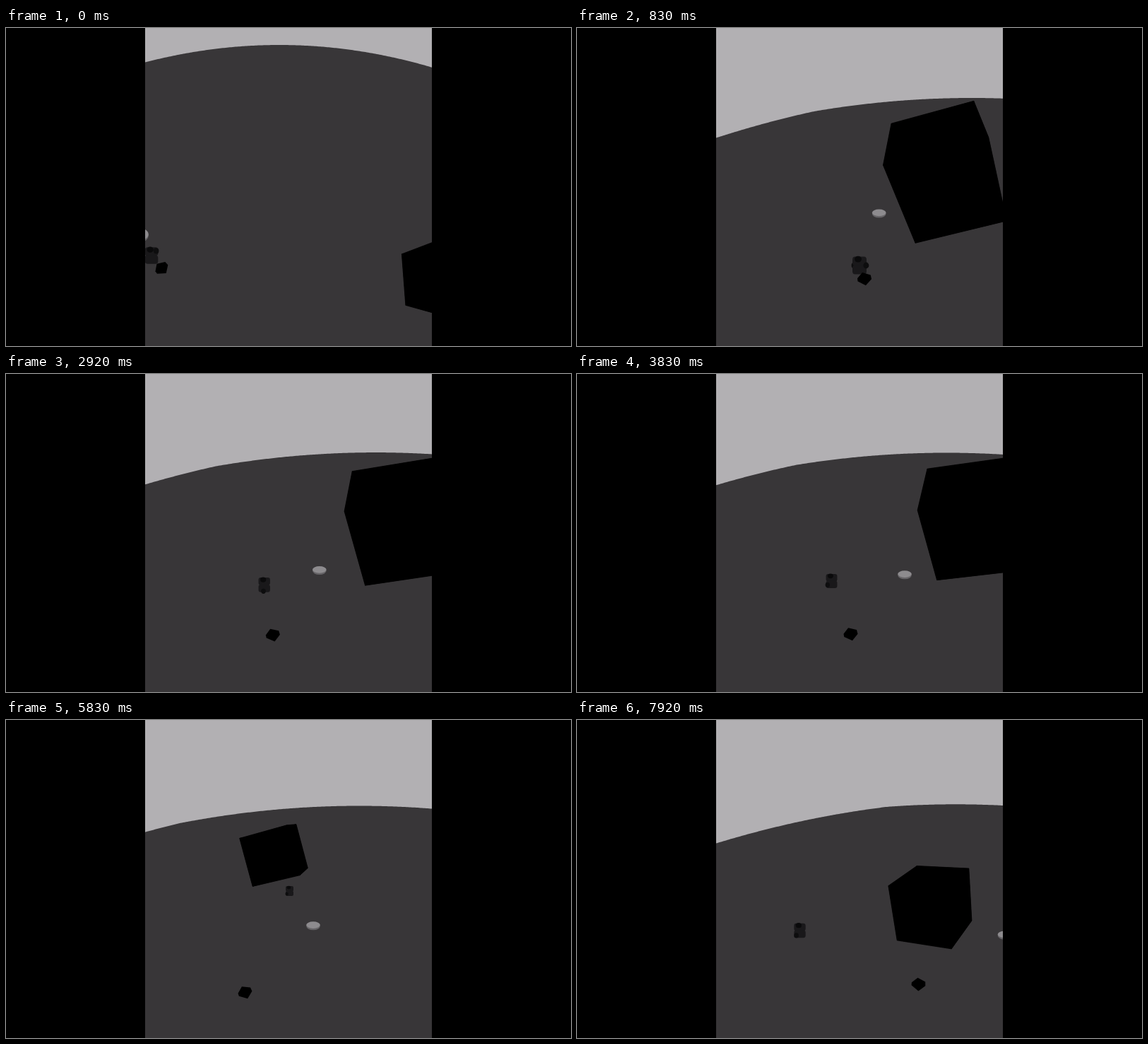
Animation of 800x450 px, one loop 8 s. Source, as an HTML page with a canvas:

```html
<!DOCTYPE html>
<html lang="en">
<head>
<meta charset="utf-8">
<title>Tumbling blocks</title>
<style>
  html, body { margin: 0; width: 100%; height: 100%; overflow: hidden; background: #000; }
  canvas { display: block; width: 100vw; height: 100vh; }
</style>
</head>
<body>
<canvas id="stage" width="800" height="450"></canvas>
<script>
const ctx = document.getElementById('stage').getContext('2d');
const LOOP = 8000, STEPS = 96;
const LEFT = 197, RIGHT = 603, HEIGHT = 450;
const FOCAL = 480;
const rad = degrees => degrees * Math.PI / 180;

// Key poses; `at` counts steps of 1/12 s.
// ridge: apex x, y; block: centre x, y, size, yaw, pitch, roll;
// chip and disc: centre x, y; figure: centre x, y, arm direction
const poses = [
  { at: 0, ridge: [387, 24], block: [617, 352, 76, 35, 20, -2],
    chip: [220.5, 340], disc: [192, 292.5], figure: [206, 322, -40] },
  { at: 10, ridge: [559, 99], block: [522, 200, 127, 5, 30, -17],
    chip: [407, 355], disc: [427.7, 262], figure: [400, 336, 0] },
  { at: 21, ridge: [524, 110.5], block: [551, 208, 122, 2, 29, -12],
    chip: [364, 371.5], disc: [414.8, 268], figure: [380.5, 305, 22] },
  { at: 46, ridge: [523, 111.5], block: [559, 203, 115, 5, 33, -10],
    chip: [387.5, 368], disc: [464, 283.7], figure: [360.5, 293, 140] },
  { at: 70, ridge: [500, 121.5], block: [381.5, 189.5, 67, 15, 2, -15],
    chip: [338.5, 385.5], disc: [435, 290.7], figure: [401.5, 242, 138] },
  { at: 83, ridge: [507, 128.3], block: [554, 236, 94, -21, 17, 5],
    chip: [453, 380.5], disc: [572.7, 308.2], figure: [405, 260, 60] },
  { at: 95, ridge: [536, 119.3], block: [504, 261, 83, 27, 24, -6],
    chip: [483.5, 374], disc: [605.5, 304], figure: [315.5, 298, 130] }
];

// Smooth interpolation that never overshoots its keys
function sample(part, step) {
  const last = poses.length - 1;
  let i = 0;
  while (i < last - 1 && step >= poses[i + 1].at) i++;
  const slope = (k, n) =>
    (poses[k + 1][part][n] - poses[k][part][n]) / (poses[k + 1].at - poses[k].at);
  const tangent = (k, n) => {
    if (k === 0) return slope(0, n);
    if (k === last) return slope(last - 1, n);
    const before = slope(k - 1, n), after = slope(k, n);
    return before * after > 0 ? 2 * before * after / (before + after) : 0;
  };
  const span = poses[i + 1].at - poses[i].at;
  const u = (step - poses[i].at) / span;
  return poses[i][part].map((from, n) =>
    from + (poses[i + 1][part][n] - from) * u * u * (3 - 2 * u)
      + span * u * (1 - u) * ((1 - u) * tangent(i, n) - u * tangent(i + 1, n)));
}

function polygon(points, color) {
  ctx.beginPath();
  for (const [x, y] of points) ctx.lineTo(x, y);
  ctx.closePath();
  ctx.fillStyle = color;
  ctx.fill();
}

function ellipse(x, y, rx, ry, color) {
  ctx.beginPath();
  ctx.ellipse(x, y, rx, ry, 0, 0, 2 * Math.PI);
  ctx.fillStyle = color;
  ctx.fill();
}

// The ground's edge is a parabola that falls off faster left of a corner
function drawGround([apexX, apexY], cornerX, settle) {
  const bend = 0.00038 + 0.0003 * settle;
  const points = [[RIGHT, HEIGHT], [LEFT, HEIGHT]];
  for (let x = LEFT; x <= RIGHT; x += 2) {
    points.push([x, apexY + bend * (x - apexX) ** 2 + 0.048 * Math.max(0, cornerX - x)]);
  }
  polygon(points, '#383638');
}

function drawDisc([x, y], settle) {
  const ry = 5.7 + 3.3 * settle;
  ellipse(x, y + 0.9, 9.8, ry, '#666467');
  ellipse(x, y - 0.6, 9.8, ry * 0.85, '#8d8b8e');
}

// The figure looks smaller the higher it stands on the ground
function drawFigure([x, y, heading]) {
  const w = 11 + (y - 242) * 0.095;
  const armX = 0.47 * w * Math.cos(rad(heading));
  const armY = 0.55 * w * Math.sin(rad(heading));
  ctx.save();
  ctx.translate(x, y);
  ellipse(-armX * 0.9, -armY * 0.5, w * 0.15, w * 0.2, '#0d0d0e');
  for (const level of [-0.3, 0.3]) {
    ctx.beginPath();
    ctx.roundRect(-w / 2, level * w - w * 0.33, w, w * 0.66, w * 0.2);
    ctx.fillStyle = '#19181a';
    ctx.fill();
  }
  ellipse(-0.1 * w, -0.45 * w, w * 0.25, w * 0.22, '#0a0a0b');
  ellipse(armX, armY, w * 0.2, w * 0.22, '#0d0d0e');
  ctx.restore();
}

// A cube in perspective, filled face by face
function drawBlock([cx, cy, size, ...angles]) {
  const [yaw, pitch, roll] = angles.map(rad);
  const turn = (a, b, angle) => [
    a * Math.cos(angle) - b * Math.sin(angle),
    a * Math.sin(angle) + b * Math.cos(angle)
  ];
  const project = ([x, y, z]) => {
    [z, x] = turn(z, x, yaw);
    [y, z] = turn(y, z, pitch);
    [x, y] = turn(x, y, roll);
    const scale = size / 2 / (1 + z * size / 2 / FOCAL);
    return [cx + x * scale, cy + y * scale];
  };
  const square = [[-1, -1], [1, -1], [1, 1], [-1, 1]];
  for (let axis = 0; axis < 3; axis++) {
    for (const side of [-1, 1]) {
      polygon(square.map(([a, b]) => {
        const corner = [];
        corner[axis] = side;
        corner[(axis + 1) % 3] = a;
        corner[(axis + 2) % 3] = b;
        return project(corner);
      }), '#000');
      ctx.strokeStyle = '#000';
      ctx.lineWidth = 0.5;
      ctx.stroke();
    }
  }
}

// The small block turns as the view pans
function drawChip([x, y]) {
  ctx.save();
  ctx.translate(x, y);
  ctx.rotate(rad((x - 364) * 0.16));
  polygon([[-4, -8.5], [8, -6.5], [10, -1], [3, 9], [-9, 4.5], [-10, 0.5]], '#000');
  ctx.restore();
}

function draw(step) {
  const settle = Math.max(0, 1 - step / 10) ** 2;
  const chip = sample('chip', step);
  ctx.fillStyle = '#000';
  ctx.fillRect(0, 0, 800, HEIGHT);
  ctx.save();
  ctx.beginPath();
  ctx.rect(LEFT, 0, RIGHT - LEFT, HEIGHT);
  ctx.clip();
  ctx.fillStyle = '#b2b0b3';
  ctx.fillRect(LEFT, 0, RIGHT - LEFT, HEIGHT);
  drawGround(sample('ridge', step), 1.34 * chip[0] - 209, settle);
  drawDisc(sample('disc', step), settle);
  drawFigure(sample('figure', step));
  drawBlock(sample('block', step));
  drawChip(chip);
  ctx.restore();
}

const start = performance.now();
function frame() {
  const time = (performance.now() - start) % LOOP;
  draw(Math.min(STEPS - 1, Math.floor((time + 5) * STEPS / LOOP)));
  requestAnimationFrame(frame);
}
frame();
</script>
</body>
</html>
```
